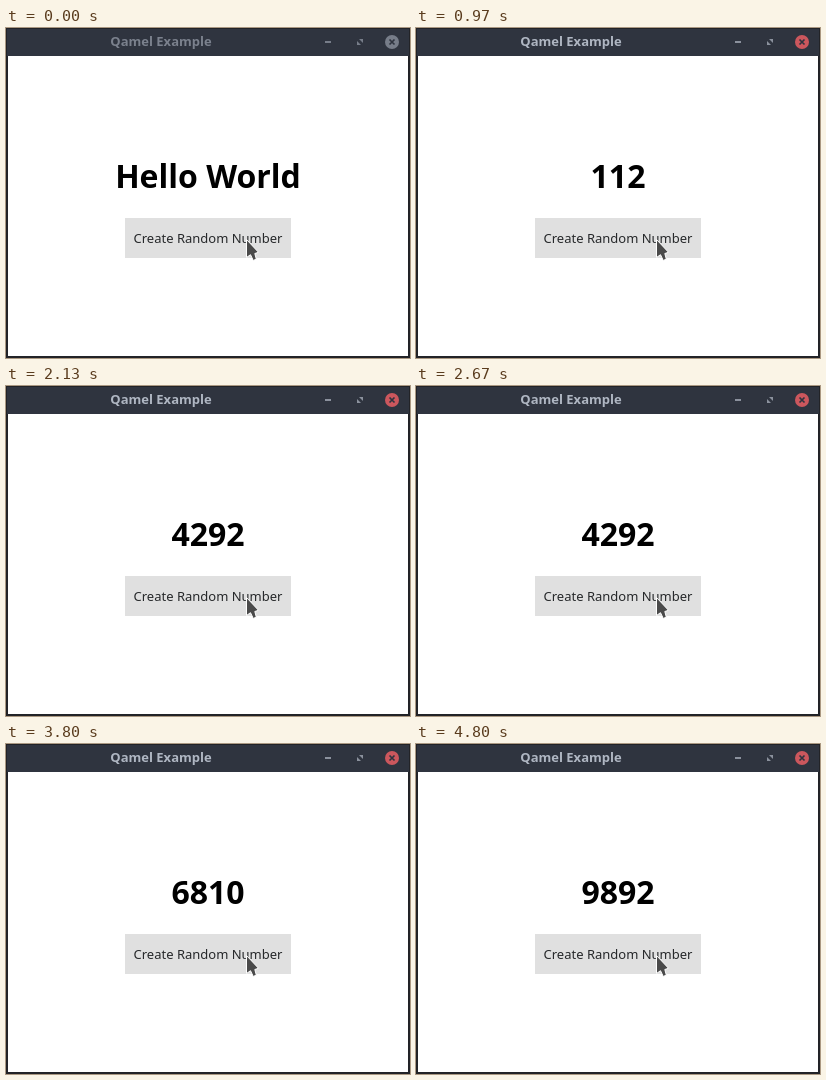
Write an HTML page that moves like this. It is 404 px wide and 330 px high and loops after 4.83 s.

```html
<!DOCTYPE html>
<html lang="en">
<head>
<meta charset="utf-8">
<title>Qamel Example</title>
<style>
  html, body { margin: 0; width: 100%; height: 100%; overflow: hidden; background: #222327; }
  svg { display: block; width: 404px; height: 330px; font-family: "Noto Sans", "Open Sans", sans-serif; }
  text { text-anchor: middle; }
  #title { font: bold 13px "Noto Sans", "Open Sans", sans-serif; fill: #afb6c2; }
  #heading { font: bold 32px "Noto Sans", "Open Sans", sans-serif; }
  #label { font-size: 13px; fill: #26282a; }
  #controls { fill: #8b919d; }
  #close { fill: #cc575d; }
  .inactive #title { fill: #7b818d; }
  .inactive #controls { fill: #777d89; }
  .inactive #close { fill: #777d89; }
</style>
</head>
<body>
<svg id="window" viewBox="0 0 404 330">
  <rect width="404" height="330" fill="#222327"/>
  <rect x="1" y="1" width="402" height="27" fill="#2f343f"/>
  <rect x="2" y="28" width="400" height="300" fill="#fff"/>
  <text id="title" x="155" y="18">Qamel Example</text>
  <g id="controls">
    <rect x="319" y="13" width="6" height="2"/>
    <path d="M353 11h4v4zM351 13v4h4z"/>
  </g>
  <circle id="close" cx="386" cy="14" r="7"/>
  <path d="M383.5 11.5l5 5m0-5l-5 5" stroke="#2f343f" stroke-width="1.7"/>
  <text id="heading" x="202" y="160"></text>
  <rect id="button" x="119" y="190" width="166" height="40"/>
  <text id="label" x="202" y="215">Create Random Number</text>
  <path d="M240.5 211.5V229.5L244.5 226.7L247.3 232.5L250.3 231L248.8 225.5L252.5 224.3Z"
        fill="#4a4a4a" stroke="#fff" stroke-width="1"/>
</svg>
<script>
  const LOOP = 4830, FIRST_PRESS = 730, PERIOD = 1030, HOLD = 110;
  const headings = ["Hello World", "112", "4292", "6810", "9892"];
  const $ = id => document.getElementById(id);

  function draw(now) {
    const sincePress = now % LOOP - FIRST_PRESS;
    const clicks = Math.floor((sincePress - HOLD) / PERIOD) + 1;
    const pressed = sincePress >= 0 && clicks < 4 && sincePress % PERIOD < HOLD;

    $("window").classList.toggle("inactive", sincePress < 0);
    $("heading").textContent = headings[Math.max(0, Math.min(clicks, 4))];
    $("button").setAttribute("fill", pressed ? "#d0d0d0" : "#e0e0e0");
    requestAnimationFrame(draw);
  }
  draw(performance.now());
</script>
</body>
</html>
```
